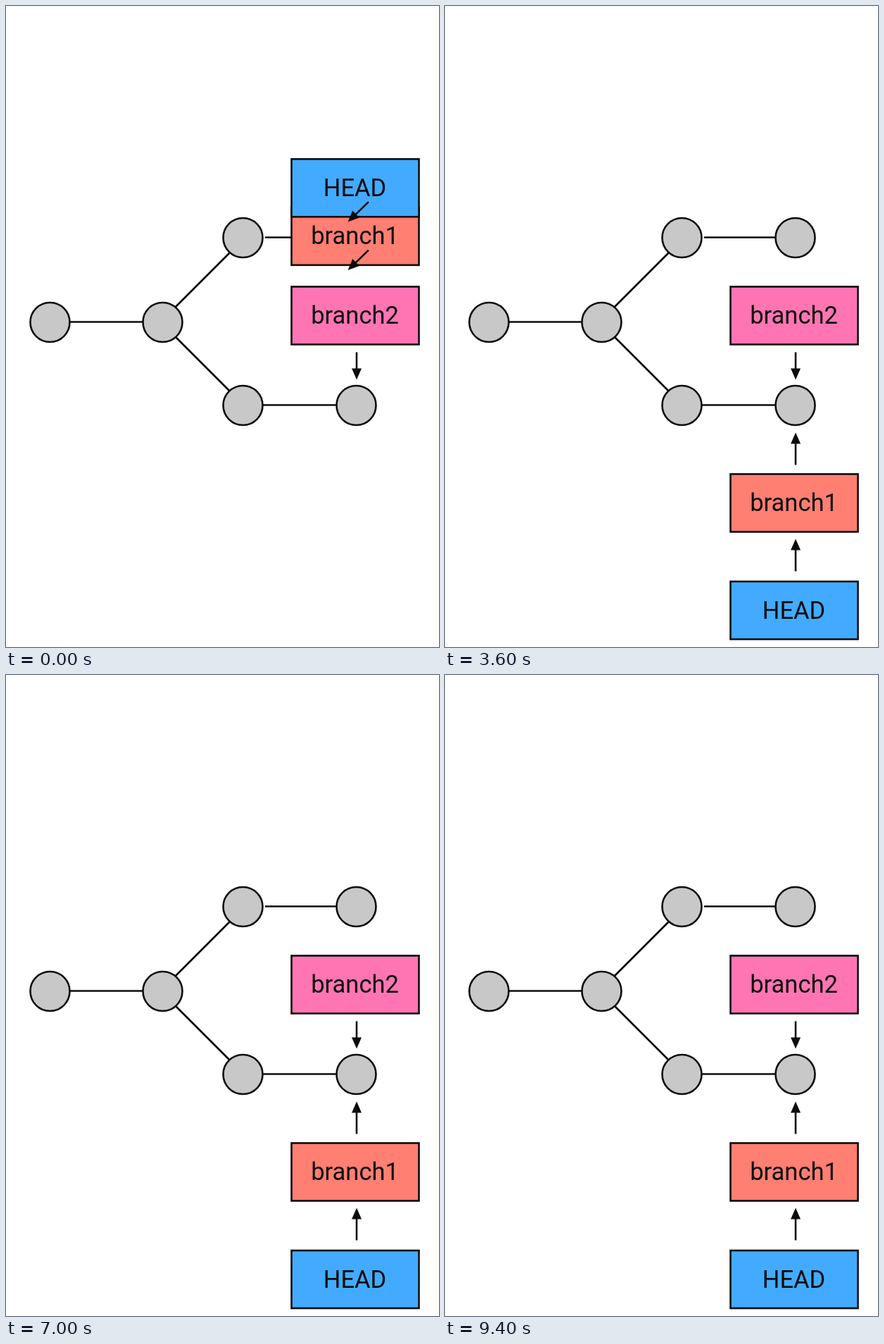
Recreate the animation shown at these times as an HTML page with a canvas. Size 615 by 910 pixels, loop 9.6 s.

```html
<!DOCTYPE html>
<html lang="en">
<head>
<meta charset="utf-8">
<title>Branch reset</title>
<style>
html, body { margin: 0; width: 100%; height: 100%; overflow: hidden; background: #fff; }
canvas { display: block; }
</style>
</head>
<body>
<canvas id="stage" width="615" height="910"></canvas>
<script>
const ctx = document.getElementById('stage').getContext('2d');
const LOOP = 9600, STEP = 200, MOVE = 900;
const INK = '#0c0c0c';

// Each pass begins at rest on top at `reset` and starts to move down at `go`.
const passes = [
  { reset: -1400, go: -303 },
  { reset: 1600, go: 2533 },
  { reset: 4600, go: 5573 },
  { reset: 7600, go: 8500 }
];

const edges = [
  [90, 448.5, 196, 448.5],
  [240, 428, 319, 349],
  [240, 469, 319, 548],
  [368, 328.5, 471, 328.5],
  [364, 566.5, 471, 566.5]
];
const commits = [[62.5, 449], [222.5, 449], [336.5, 329], [497.5, 329], [336.5, 567], [497.5, 567]];

const mix = (a, b, k) => a + (b - a) * k;

function progress(t) {
  const pass = passes.filter(p => p.reset <= t).pop();
  const x = Math.min(1, Math.max(0, (t - pass.go) / MOVE));
  return (1 - Math.cos(Math.PI * x)) / 2;
}

function line(x1, y1, x2, y2) {
  ctx.beginPath();
  ctx.moveTo(x1, y1);
  ctx.lineTo(x2, y2);
  ctx.stroke();
}

function commit(x, y) {
  ctx.beginPath();
  ctx.arc(x, y, 28, 0, 2 * Math.PI);
  ctx.fillStyle = '#c8c8c8';
  ctx.fill();
  ctx.stroke();
}

function label(text, color, y) {
  ctx.fillStyle = color;
  ctx.fillRect(405.5, y, 181, 82);
  ctx.strokeRect(405.5, y, 181, 82);
  ctx.fillStyle = INK;
  ctx.fillText(text, 495.5, y + 52.5);
}

// Arrow centred on (x, y); turn 0 points down, 1 points up, clockwise.
function arrow(x, y, length, turn) {
  const half = length / 2;
  ctx.save();
  ctx.translate(x, y);
  ctx.rotate(Math.PI * (0.5 + turn));
  line(-half, 0, half - 10, 0);
  ctx.beginPath();
  ctx.moveTo(half, 0);
  ctx.lineTo(half - 16, -7);
  ctx.lineTo(half - 16, 7);
  ctx.fillStyle = INK;
  ctx.fill();
  ctx.restore();
}

function draw(k) {
  ctx.fillStyle = '#fff';
  ctx.fillRect(0, 0, 615, 910);
  ctx.strokeStyle = INK;
  ctx.lineWidth = 2.6;
  ctx.font = '34.5px Roboto, sans-serif';
  ctx.textAlign = 'center';

  edges.forEach(e => line(...e));
  commits.forEach(c => commit(...c));
  label('branch2', '#ff75b3', 398.5);
  arrow(498, 511, 39, 0);

  label('branch1', '#ff7f72', mix(156.5, 664.5, k));
  label('HEAD', '#42abff', mix(12.5, 817, k));
  const x = mix(501, 498, k), length = mix(39, 46, k);
  arrow(x, mix(126, 779.5, k), length, k);
  arrow(x, mix(269.5, 628.5, k), length, k);
}

const start = performance.now();
function tick() {
  const t = (performance.now() - start) % LOOP;
  draw(progress(Math.floor(t / STEP) * STEP));
  requestAnimationFrame(tick);
}
tick();
</script>
</body>
</html>
```
